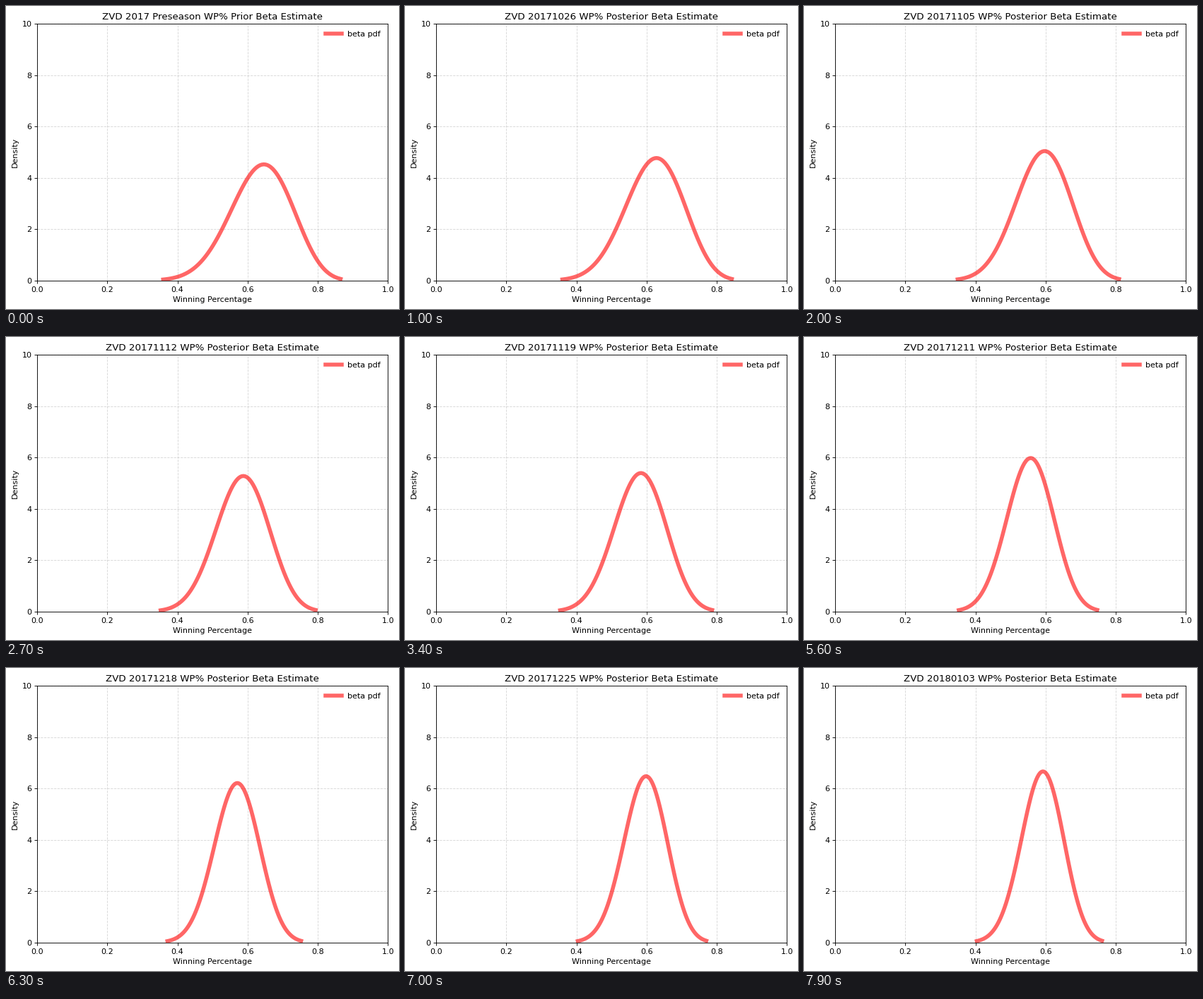
Write a matplotlib script that moves like this. It is 556 by 428 pixels and loops after 8000 ms.

```python
import math

import numpy as np
import matplotlib.pyplot as plt
from matplotlib.animation import FuncAnimation

W, H, DPI = 556, 428, 80
LEFT, BOTTOM, AX_W, AX_H = 44.222, 40.222, 496, 362.4  # axes box in pixels
FRAMES, INTERVAL = 80, 100
TEAM = "ZVD"
EVE = np.datetime64("2017-10-16")  # the day before the season opens

# Beta prior, and the season days on which games were won or lost
PRIOR_A, PRIOR_B = 19.1, 10.9
WINS = [3, 9, 12, 15, 25, 27, 30, 37, 46, 48, 50, 54,
        58, 60, 63, 65, 67, 68, 70, 72, 79]
LOSSES = [5, 6, 11, 18, 20, 22, 24, 32, 35, 39, 40, 44, 52, 56, 61, 74, 76]

plt.rcParams.update({"font.family": "DejaVu Sans", "font.size": 10})


def beta_pdf(x, a, b):
    log_norm = math.lgamma(a + b) - math.lgamma(a) - math.lgamma(b)
    return np.exp(log_norm + (a - 1) * np.log(x) + (b - 1) * np.log(1 - x))


def beta_curve(a, b, tail=0.001):
    """Density between the lower and upper tail quantiles."""
    grid = np.linspace(0.0005, 0.9995, 4000)
    cdf = np.cumsum(beta_pdf(grid, a, b))
    lo, hi = np.interp([tail, 1 - tail], cdf / cdf[-1], grid)
    x = np.linspace(lo, hi, 100)
    return x, beta_pdf(x, a, b)


def title_for(day):
    if day == 0:
        return f"{TEAM} 2017 Preseason WP% Prior Beta Estimate"
    date = str(EVE + day).replace("-", "")
    return f"{TEAM} {date} WP% Posterior Beta Estimate"


fig = plt.figure(figsize=(W / DPI, H / DPI), dpi=DPI, facecolor="white")
ax = fig.add_axes([LEFT / W, BOTTOM / H, AX_W / W, AX_H / H])
ax.set(xlim=(0, 1), ylim=(0, 10), xlabel="Winning Percentage",
       ylabel="Density")
ax.grid(linestyle="--", alpha=0.5)
line, = ax.plot([], [], "r-", lw=5, alpha=0.6, label="beta pdf")
ax.legend(loc="upper right", frameon=False)
title = ax.set_title("")


def update(day):
    won = sum(d <= day for d in WINS)
    lost = sum(d <= day for d in LOSSES)
    line.set_data(*beta_curve(PRIOR_A + won, PRIOR_B + lost))
    title.set_text(title_for(day))
    return line, title


anim = FuncAnimation(fig, update, frames=FRAMES, interval=INTERVAL,
                     repeat=True, repeat_delay=0, blit=False)
plt.show()
```
